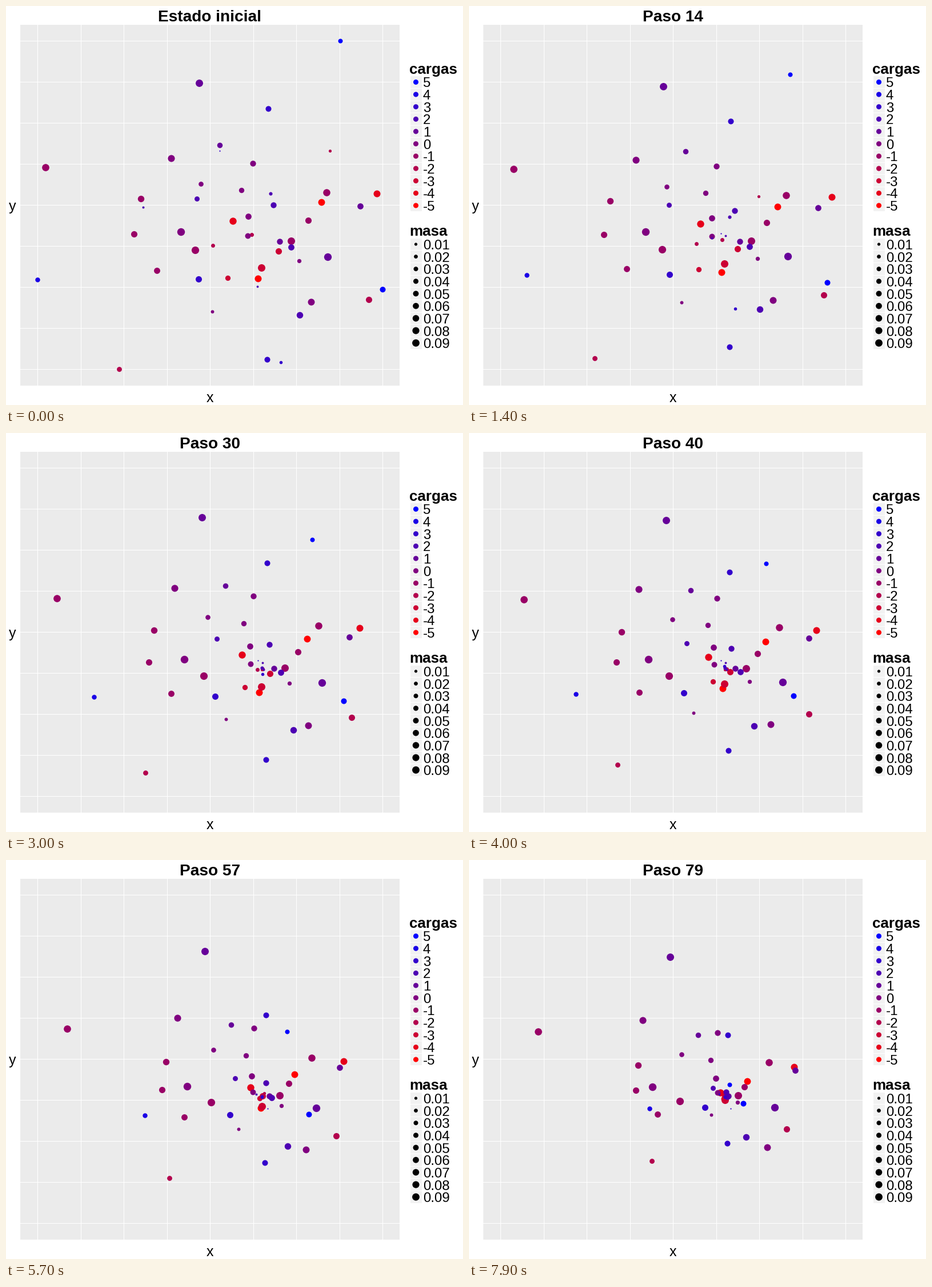
A matplotlib script for the animation above (8000 ms loop, 800x700 px).

```python
import numpy as np
import matplotlib.pyplot as plt
from matplotlib.animation import FuncAnimation
from matplotlib.patches import Circle, Rectangle

W, H, DPI = 800, 700, 100
STEPS, INTERVAL = 80, 100
CENTER = np.array([448.0, 414.0])  # where the whole cloud collapses

# charge: start x, start y, mass (hundredths)
PARTICLES = {
    -5: [(552, 344, 7.6), (441, 478, 7.7)],
    -4: [(649, 329, 7.8), (397, 377, 8.4)],
    -3: [(477, 430, 6.5), (388, 477, 4.3), (447, 459, 9.3)],
    -2: [(635, 515, 6.4), (198, 637, 3.8), (567, 254, 1.0),
         (430, 401, 2.2), (362, 420, 2.1)],
    -1: [(69, 283, 8.8), (236, 338, 6.9), (561, 327, 8.6), (529, 376, 6.5),
         (224, 400, 6.5), (331, 428, 9.6), (499, 412, 9.3), (264, 464, 6.2)],
    0: [(432, 276, 5.5), (289, 267, 8), (341, 312, 3.6), (412, 323, 4.4),
        (424, 369, 6), (306, 396, 10), (423, 403, 5), (361, 536, 1.4),
        (534, 519, 7.7), (513, 447, 2.4)],
    1: [(338, 135, 9.2), (374, 244, 4.6), (620, 351, 6), (479, 413, 5.6),
        (563, 440, 9.8)],
    2: [(468, 349, 5.5), (334, 338, 3.9), (499, 423, 6.1), (514, 542, 7),
        (463, 329, 1.55), (240, 353, 0.45), (440, 492, 0.4)],
    3: [(459, 180, 5.2), (337, 479, 6.4), (457, 620, 5.2), (481, 625, 1.2),
        (374, 254, 0.05)],
    4: [(55, 480, 3.4)],
    5: [(585, 61, 3.0), (659, 497, 5.1)],
}

plt.rcParams["font.family"] = "Liberation Sans"
fig = plt.figure(figsize=(W / DPI, H / DPI), dpi=DPI, facecolor="white")
ax = fig.add_axes([0, 0, 1, 1])
ax.set(xlim=(0, W), ylim=(H, 0))
ax.axis("off")


def charge_color(q):
    return ((5 - q) / 10, 0, (5 + q) / 10)


def radius(mass):
    return 0.7 + 1.9 * np.sqrt(mass)


def pull(q):
    """Attraction grows with charge and levels off on the negative side."""
    return 2.7 + 2.6 * q if q > 0 else 11.5 - 8.8 * 0.5 ** -q


def path(q, start, mass):
    """Walk at steady speed to the center; light particles overshoot it."""
    pos = np.array(start, float)
    dist = np.hypot(*(CENTER - pos))
    speed = min(pull(q) * dist / (dist + 60) / mass, 40)
    track = [pos]
    for _ in range(STEPS - 1):
        gap = CENTER - pos
        pos = pos + speed * gap / max(np.hypot(*gap), 1e-6)
        track.append(pos)
    return np.array(track)


def box(x, y, w, h, color, edge="none"):
    ax.add_patch(Rectangle((x, y), w, h, fc=color, ec=edge, lw=0.72, zorder=0))


def label(x, y, text, px, ha="left", weight="normal"):
    return ax.text(x, y, text, fontsize=px * 72 / DPI, ha=ha,
                   va="baseline", weight=weight)


def disc(x, y, r, color, z=3):
    return ax.add_patch(Circle((x + 0.5, y + 0.5), r, fc=color, ec="none",
                               lw=0, zorder=z, snap=False))


def legend(title, base, top, entries):
    label(706, base, title, 26, weight="bold")
    for i, (text, r, color) in enumerate(entries):
        y = top + 21.65 * i
        box(706.5, y - 10.8, 21.6, 21.65, "#f2f2f2", "white")
        disc(717, y, r, color)
        label(730, y + 9.5, text, 24)


# Panel, grid and axis titles
box(25, 33, 664, 633, "#ebebeb")
for i in range(9):
    x, y = int(55.5 + 75.5 * i), 61 + 72 * i
    box(x, 33, 1, 633, "white")
    box(25, y, 664, 1, "white")
title = label(357, 27, "", 28, "center", "bold")
label(357, 695, "x", 25, "center")
label(11, 359.5, "y", 25, "center")

legend("cargas", 119, 133,
       [(str(q), 4.5, charge_color(q)) for q in range(5, -6, -1)])
legend("masa", 403, 417.5,
       [(f"0.0{m}", radius(m), "black") for m in range(1, 10)])

dots = [(disc(x, y, radius(m), charge_color(q), 4 + q / 10),
         path(q, (x, y), m))
        for q, group in PARTICLES.items() for x, y, m in group]


def draw(n):
    title.set_text(f"Paso {n}" if n else "Estado inicial")
    for patch, track in dots:
        patch.center = np.round(track[n]) + 0.5
    return [title] + [patch for patch, _ in dots]


anim = FuncAnimation(fig, draw, frames=STEPS, interval=INTERVAL,
                     repeat=True, repeat_delay=0, blit=False)
plt.show()
```
